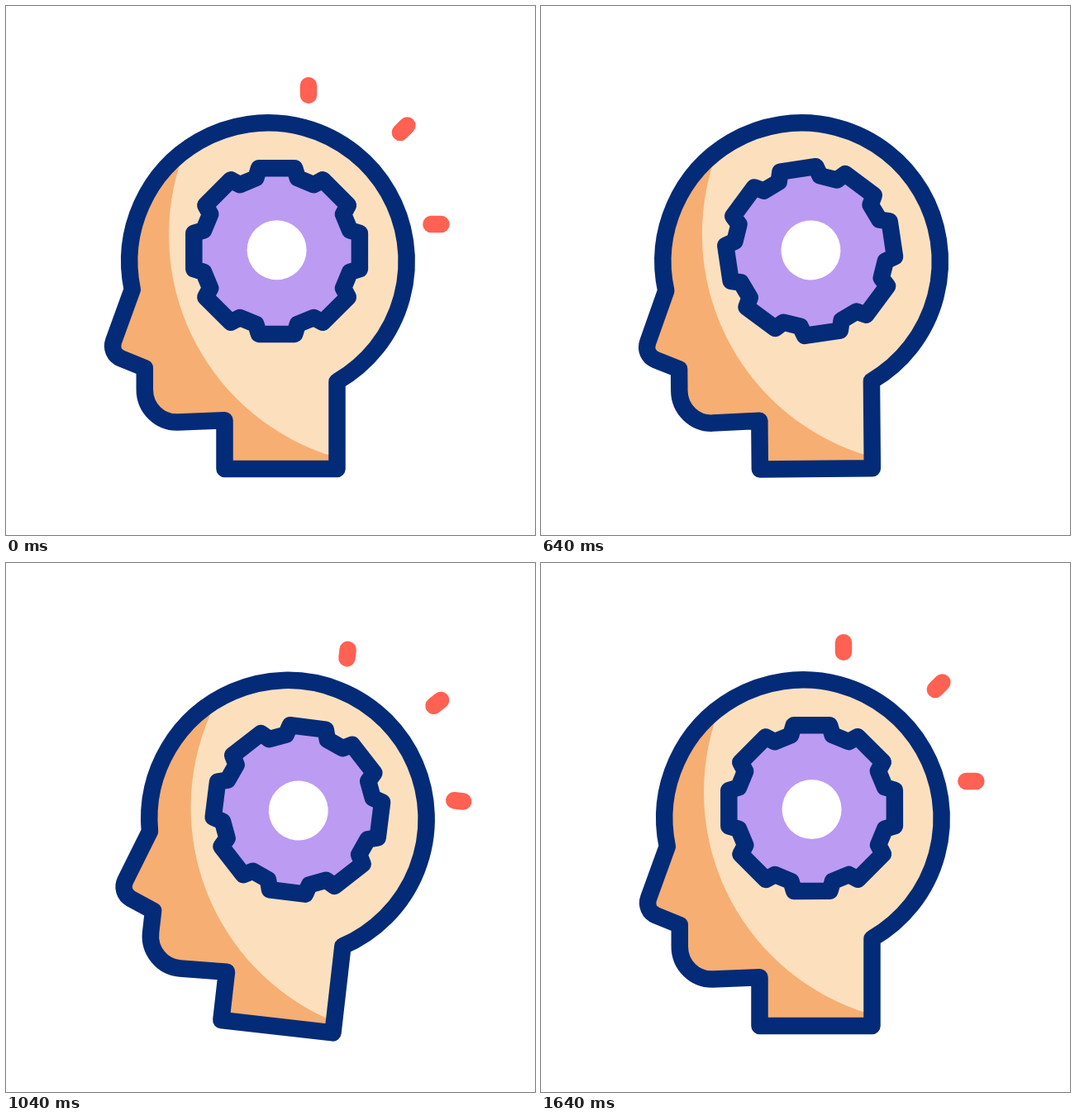
Recreate the animation shown at these times as an HTML page with a canvas. Size 640 by 640 pixels, loop 1760 ms.

```html
<!DOCTYPE html>
<html lang="en">
<head>
<meta charset="utf-8">
<title>Thinking head</title>
<style>
  html, body { margin: 0; width: 100%; height: 100%; overflow: hidden; background: #fff; }
  canvas { display: block; width: 640px; height: 640px; }
</style>
</head>
<body>
<canvas id="stage" width="640" height="640"></canvas>
<script>
const ctx = document.getElementById('stage').getContext('2d');
const LOOP = 1760, STEP = 40;
const NAVY = '#032b77', LIGHT = '#fce0be', SHADE = '#f6ae73', PURPLE = '#bc9bf2', CORAL = '#ff6152';
const LINE = 20.5;
const RAD = Math.PI / 180;
const PIVOT = { x: 324, y: 520 };
const GEAR = { x: 327.6, y: 296.6 };

// Inner end to outer end of each ray.
const RAYS = [
  [366, 107.7, 366, 96.3],
  [476.9, 153.1, 485.4, 144.6],
  [514.4, 264, 526.4, 264]
];

// Symmetric cubic-bezier(a, 0, 1 - a, 1), solved by bisection.
function ease(u, a = 0.6) {
  if (u <= 0) return 0;
  if (u >= 1) return 1;
  let lo = 0, hi = 1, s = 0.5;
  for (let i = 0; i < 24; i++) {
    s = (lo + hi) / 2;
    const r = 1 - s;
    const x = 3 * r * r * s * a + 3 * r * s * s * (1 - a) + s * s * s;
    if (x < u) lo = s; else hi = s;
  }
  return s * s * (3 - 2 * s);
}

const progress = (t, from, to, a) => ease((t - from) / (to - from), a);

function headAngle(t) {
  return -8 * progress(t, 40, 400)
       + 15 * progress(t, 400, 880)
       - 7 * progress(t, 880, 1560);
}

function headPath() {
  const p = new Path2D();
  p.moveTo(400.5, 560);
  p.lineTo(400.5, 454.4);
  p.arc(317, 309, 167.7, Math.atan2(145.4, 83.5), Math.atan2(34, -164.2), true);
  p.lineTo(130.3, 405);
  p.bezierCurveTo(127, 414, 131, 423, 139.5, 426.5);
  p.lineTo(167.8, 438);
  p.lineTo(167.8, 464);
  p.bezierCurveTo(167.8, 486.5, 186, 504.3, 208, 503.6);
  p.lineTo(264.5, 501.3);
  p.lineTo(264.5, 560);
  p.closePath();
  return p;
}

function gearPath() {
  const p = new Path2D();
  const add = (deg, r) => p.lineTo(r * Math.sin(deg * RAD), -r * Math.cos(deg * RAD));
  for (let deg = 0; deg < 360; deg += 45) {
    add(deg - 15.9, 92);
    add(deg - 12.2, 102.6);
    add(deg + 12.2, 102.6);
    add(deg + 15.9, 92);
  }
  p.closePath();
  return p;
}

const head = headPath(), gear = gearPath();

function disc(x, y, r, color) {
  ctx.fillStyle = color;
  ctx.beginPath();
  ctx.arc(x, y, r, 0, 2 * Math.PI);
  ctx.fill();
}

function drawHead() {
  ctx.fillStyle = SHADE;
  ctx.fill(head);
  ctx.save();
  ctx.clip(head);
  disc(477, 277, 280, LIGHT);
  ctx.restore();
  ctx.strokeStyle = NAVY;
  ctx.stroke(head);
}

function drawGear(t) {
  ctx.save();
  ctx.translate(GEAR.x, GEAR.y);
  ctx.rotate(180 * RAD * progress(t, 40, 1680, 0.62));
  ctx.fillStyle = PURPLE;
  ctx.fill(gear);
  ctx.strokeStyle = NAVY;
  ctx.stroke(gear);
  disc(0, -1.4, 36, '#fff');
  ctx.restore();
}

// Rays shrink towards their outer ends, then grow again from the inner ends.
function drawRays(t) {
  const growing = t > 620;
  const from = growing ? 0 : progress(t, 240, 600);
  const to = growing ? progress(t, 630, 1185) : 1;
  if (to - from < 0.002) return;
  ctx.strokeStyle = CORAL;
  for (const [x0, y0, x1, y1] of RAYS) {
    const dx = x1 - x0, dy = y1 - y0;
    ctx.beginPath();
    ctx.moveTo(x0 + dx * from, y0 + dy * from);
    ctx.lineTo(x0 + dx * to, y0 + dy * to);
    ctx.stroke();
  }
}

function draw(t) {
  ctx.fillStyle = '#fff';
  ctx.fillRect(0, 0, 640, 640);
  ctx.save();
  ctx.lineWidth = LINE;
  ctx.lineJoin = ctx.lineCap = 'round';
  ctx.translate(PIVOT.x, PIVOT.y);
  ctx.rotate(headAngle(t) * RAD);
  ctx.translate(-PIVOT.x, -PIVOT.y);
  drawHead();
  drawGear(t);
  drawRays(t);
  ctx.restore();
}

const start = performance.now();
function tick() {
  const t = (performance.now() - start) % LOOP;
  draw(Math.floor(t / STEP) * STEP);
  requestAnimationFrame(tick);
}
tick();
</script>
</body>
</html>
```
